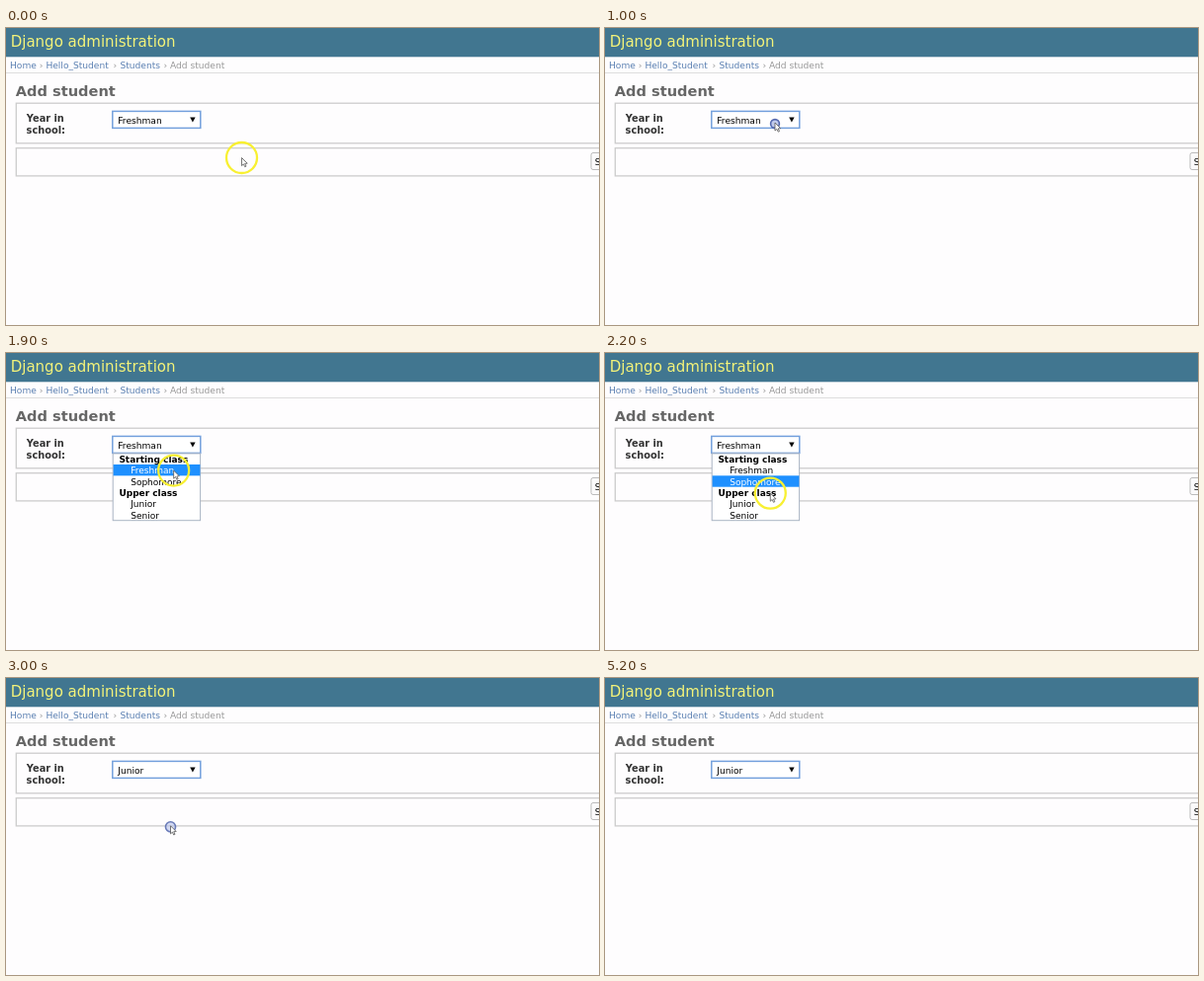
Write an HTML page that moves like this. It is 600 px wide and 301 px high and loops after 6 s.

```html
<!DOCTYPE html>
<html lang="en">
<head>
<meta charset="utf-8">
<title>Add student</title>
<style>
  html, body { margin: 0; width: 100%; height: 100%; overflow: hidden; background: #fefdfe; }
  svg { display: block; width: 600px; height: 301px; font: 9.1px "DejaVu Sans", Verdana, sans-serif; }
  text { white-space: pre; }
  .b { font-weight: bold; }
  .link { fill: #5b80b2; }
  .dim { fill: #999; }
  .box { fill: #fefdfe; stroke: #ccc; stroke-width: 1.3; }
  #menu { font-size: 9px; }
</style>
</head>
<body>
<svg viewBox="0 0 600 301">
  <rect width="600" height="29.3" fill="#417690"/>
  <text x="4.7" y="19" font-size="15" fill="#f4f379">Django administration</text>
  <rect y="45" width="600" height="1" fill="#ddd"/>
  <g id="crumbs"></g>
  <text class="b" x="9.8" y="69.4" font-size="14.6" fill="#666">Add student</text>

  <rect class="box" x="10.3" y="76.2" width="600" height="40.6"/>
  <g class="b" font-size="9.8" fill="#333">
    <text x="20.8" y="95">Year in</text>
    <text x="20.6" y="107">school:</text>
  </g>
  <rect class="box" x="10.3" y="121.7" width="600" height="28.2"/>
  <rect x="592" y="126.5" width="30" height="17" rx="2" fill="#fbfafb" stroke="#bbb"/>
  <text x="595.8" y="138.6">Save</text>

  <rect x="107.8" y="84.4" width="89" height="17" fill="#fff" stroke="#73a0dc" stroke-width="1.5"/>
  <text id="value" x="113.3" y="97"></text>
  <path d="M186.2 90.6h5.4l-2.7 5z"/>

  <g id="menu">
    <rect x="108.2" y="101.9" width="88.4" height="67.8" fill="#fff" stroke="#a9b4c4"/>
    <rect id="mark" x="108.6" width="87.8" height="11.4" fill="#1e90ff"/>
  </g>

  <g id="cursor">
    <circle id="ring" r="15.5" fill="none" stroke="#f8f032" stroke-width="2.3"/>
    <circle id="click" cy="1" fill="#b9c4ea" stroke="#5468ae" stroke-width="1.6"/>
    <path d="M0 0V8.1L1.9 6.4 3.2 9.2 4.5 8.6 3.2 5.9 5.7 5.7Z" fill="#fff" stroke="#555" stroke-width=".8"/>
  </g>
</svg>
<script>
const LOOP = 6000, TICK = 100;
const $ = id => document.getElementById(id);

function addText(parent, x, y, str, cls = "") {
  const el = document.createElementNS("http://www.w3.org/2000/svg", "text");
  el.setAttribute("x", x);
  el.setAttribute("y", y);
  el.setAttribute("class", cls);
  el.textContent = str;
  parent.append(el);
  return el;
}

function set(el, attrs) {
  for (const name in attrs) el.setAttribute(name, attrs[name]);
}

[[4, "Home", "link"], [33.7, "›", "dim"], [40.4, "Hello_Student", "link"], [108.4, "›", "dim"],
 [115.5, "Students", "link"], [159.4, "›", "dim"], [166, "Add student", "dim"]]
  .forEach(([x, str, cls]) => addText($("crumbs"), x, 41, str, cls));

const ROW = 11.35, MENU_TOP = 101.9;
const rows = ["Starting class", "Freshman", "Sophomore", "Upper class", "Junior", "Senior"];
const labels = rows.map((str, i) => {
  const group = i % 3 === 0;
  return addText($("menu"), group ? 114.4 : 126.2, MENU_TOP + ROW * i + 8.9, str, group ? "b" : "");
});

// time, x, y
const path = [
  [0, 238.5, 131.5], [600, 172, 96], [1600, 172, 96], [2300, 166.5, 149.8],
  [3500, 166.5, 149.8], [3600, 166, 164], [3700, 165.5, 215], [3800, 165, 279]
];
const clicks = [1000, 2900], CLICK_LENGTH = 600;
const OPEN = 1100, CLOSE = 3000, GONE = 3900;

function place(t) {
  const i = path.findIndex(p => p[0] > t);
  if (i < 0) return path[path.length - 1].slice(1);
  const [t0, x0, y0] = path[i - 1], [t1, x1, y1] = path[i];
  const k = (t - t0) / (t1 - t0);
  return [x0 + (x1 - x0) * k, y0 + (y1 - y0) * k];
}

function draw(t) {
  const [x, y] = place(t);
  set($("cursor"), {
    transform: `translate(${x} ${y})`,
    visibility: t < GONE ? "visible" : "hidden"
  });

  const start = clicks.find(c => t >= c && t < c + CLICK_LENGTH);
  const pressed = start !== undefined;
  const k = pressed ? (t - start) / CLICK_LENGTH : 0;
  const ringOff = clicks.some(c => t >= c && t <= c + CLICK_LENGTH);
  set($("ring"), { opacity: ringOff ? 0 : 1 });
  set($("click"), {
    r: 4.4 + 4 * k,
    opacity: pressed ? 1 - 0.85 * k : 0,
    "fill-opacity": 0.9 - k
  });

  const marked = t < 2000 ? 1 : t < 2400 ? 2 : 4;
  $("menu").style.display = t >= OPEN && t < CLOSE ? "" : "none";
  set($("mark"), { y: MENU_TOP + ROW * marked - 0.3 });
  labels.forEach((el, i) => set(el, { fill: i === marked ? "#fff" : "#000" }));
  $("value").textContent = t < CLOSE ? "Freshman" : "Junior";
}

const begin = performance.now();
function frame() {
  const t = (performance.now() - begin) % LOOP;
  draw(Math.floor(t / TICK) * TICK);
  requestAnimationFrame(frame);
}
frame();
</script>
</body>
</html>
```
